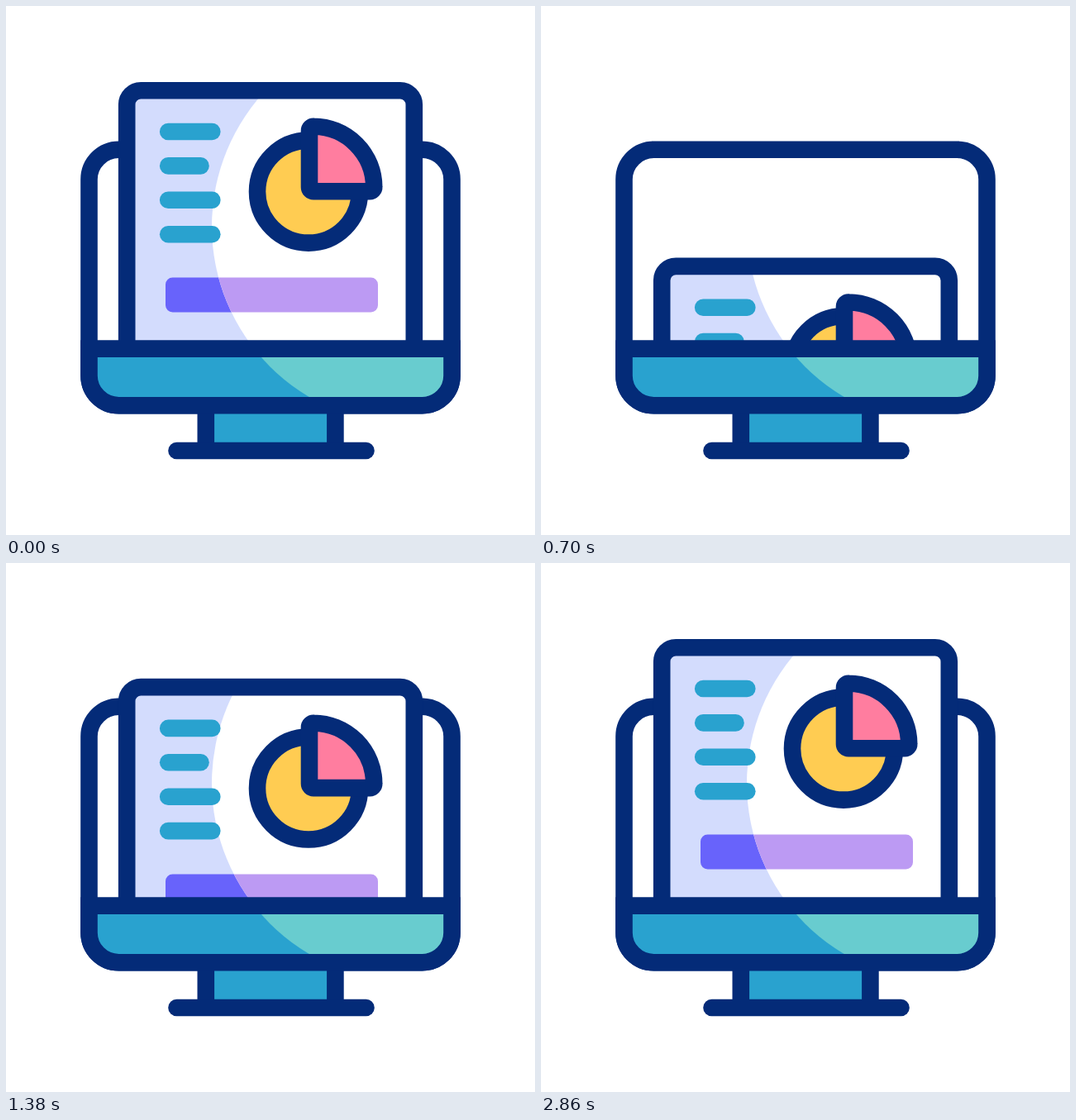
An HTML page for the animation above (3240 ms loop, 640 by 640 pixels).

```html
<!DOCTYPE html>
<html lang="en">
<head>
<meta charset="utf-8">
<title>Presentation monitor</title>
<style>
  html, body { margin: 0; width: 100%; height: 100%; overflow: hidden; background: #fff; }
  svg { display: block; width: 100%; height: 100%; }
  .ink { fill: none; stroke: #042b78; stroke-width: 20.6; }
  .cap { fill: none; stroke-width: 20.6; stroke-linecap: round; }
</style>
</head>
<body>
<svg viewBox="0 0 640 640">
  <defs>
    <clipPath id="shine"><circle cx="489" cy="266.5" r="240"/></clipPath>
    <clipPath id="above"><rect width="640" height="414"/></clipPath>
  </defs>

  <!-- monitor back -->
  <rect class="ink" x="100.5" y="173.8" width="439" height="309.4" rx="36"/>

  <!-- sliding panel -->
  <g clip-path="url(#above)">
    <g class="slide">
      <rect x="146" y="102" width="348" height="500" rx="17" fill="#d3dcfd"/>
      <rect x="193" y="328.5" width="257" height="42" rx="8.5" fill="#6863fb"/>
    </g>
    <g clip-path="url(#shine)">
      <g class="slide">
        <rect x="146" y="102" width="348" height="500" rx="17" fill="#fff"/>
        <rect x="193" y="328.5" width="257" height="42" rx="8.5" fill="#bc9af3"/>
      </g>
    </g>
    <g class="slide">
      <rect class="ink" x="146.2" y="102.2" width="347.6" height="500" rx="17"/>
      <g id="bars" class="cap" stroke="#29a2cf"></g>
      <circle class="ink" cx="366" cy="224.6" r="62" style="fill:#ffcc52"/>
      <path id="slice" class="ink" d="M367 151 a5 5 0 0 1 5.4 -5.2 A73.3 73.3 0 0 1 445.2 219 a5 5 0 0 1 -5 5.2 H372 a5 5 0 0 1 -5 -5 Z"/>
    </g>
  </g>

  <!-- stand -->
  <rect x="242" y="484" width="156" height="54" fill="#29a2cf"/>
  <path class="ink" d="M241.8 483 V538 M398.4 483 V538"/>
  <path class="ink" stroke-linecap="round" d="M206.5 538 H435.5"/>

  <!-- monitor chin -->
  <path id="chin" d="M100.5 414.6 H539.5 V447.2 a36 36 0 0 1 -36 36 H136.5 a36 36 0 0 1 -36 -36 Z" fill="#29a2cf"/>
  <use href="#chin" style="display:none"/>
  <path d="M100.5 414.6 H539.5 V447.2 a36 36 0 0 1 -36 36 H136.5 a36 36 0 0 1 -36 -36 Z" fill="#68cccf" clip-path="url(#shine)"/>
  <path class="ink" d="M100.5 414.6 H539.5 V447.2 a36 36 0 0 1 -36 36 H136.5 a36 36 0 0 1 -36 -36 Z"/>

  <g id="rays" class="cap" stroke="#ffcc52"></g>
</svg>
<script>
const LOOP = 3240;

// Keyframes: [time, value]
const SLIDE = [[240, 0], [410, -40], [868, 322], [1596, -25], [1728, 21], [1850, 0]];
const TINT = [[1420, 0], [1680, 1], [2520, 1], [2860, 0]];
const STRETCH = [[1860, 0], [2340, 1], [2860, 0]];
const RAY_TIP = [[1575, 0], [1860, 1]];
const RAY_TAIL = [[1850, 0], [2140, 1]];

// y, right end, extra length
const BARS = [[152, 249.3, 19], [193.4, 235.5, 29.5], [234.8, 249.3, 25], [276.2, 249.3, 25]];
// base x, y, tip x, y
const RAYS = [[508, 95.5, 504.6, 63], [545.5, 117.5, 575, 71], [581.5, 144.5, 610, 134.5]];
const PINK = [255, 125, 159], BLUE = [41, 162, 207];

const $ = id => document.getElementById(id);
const mix = (a, b, k) => a + (b - a) * k;
const ease = k => k * k * (3 - 2 * k);

function track(keys, t) {
  if (t <= keys[0][0]) return keys[0][1];
  for (let i = 1; i < keys.length; i++) {
    const [t0, a] = keys[i - 1], [t1, b] = keys[i];
    if (t < t1) return mix(a, b, ease((t - t0) / (t1 - t0)));
  }
  return keys[keys.length - 1][1];
}

function addPath(parent) {
  const path = document.createElementNS('http://www.w3.org/2000/svg', 'path');
  return parent.appendChild(path);
}

const slides = document.querySelectorAll('.slide');
const slice = $('slice');
const bars = BARS.map(() => addPath($('bars')));
const rays = RAYS.map(() => addPath($('rays')));

function draw(t) {
  const y = track(SLIDE, t);
  slides.forEach(g => g.setAttribute('transform', `translate(0 ${y})`));

  const tint = track(TINT, t);
  slice.style.fill = `rgb(${PINK.map((c, i) => Math.round(mix(c, BLUE[i], tint)))})`;

  const grow = track(STRETCH, t);
  BARS.forEach(([by, end, extra], i) =>
    bars[i].setAttribute('d', `M196.2 ${by} H${end + extra * grow}`));

  const tip = track(RAY_TIP, t), tail = track(RAY_TAIL, t);
  RAYS.forEach(([x0, y0, x1, y1], i) => {
    const at = k => `${mix(x0, x1, k)} ${mix(y0, y1, k)}`;
    rays[i].setAttribute('d', tip - tail > 0.001 ? `M${at(tail)} L${at(tip)}` : '');
  });
}

const start = performance.now();
function frame() {
  draw((performance.now() - start) % LOOP);
  requestAnimationFrame(frame);
}
draw(0);
requestAnimationFrame(frame);
</script>
</body>
</html>
```
